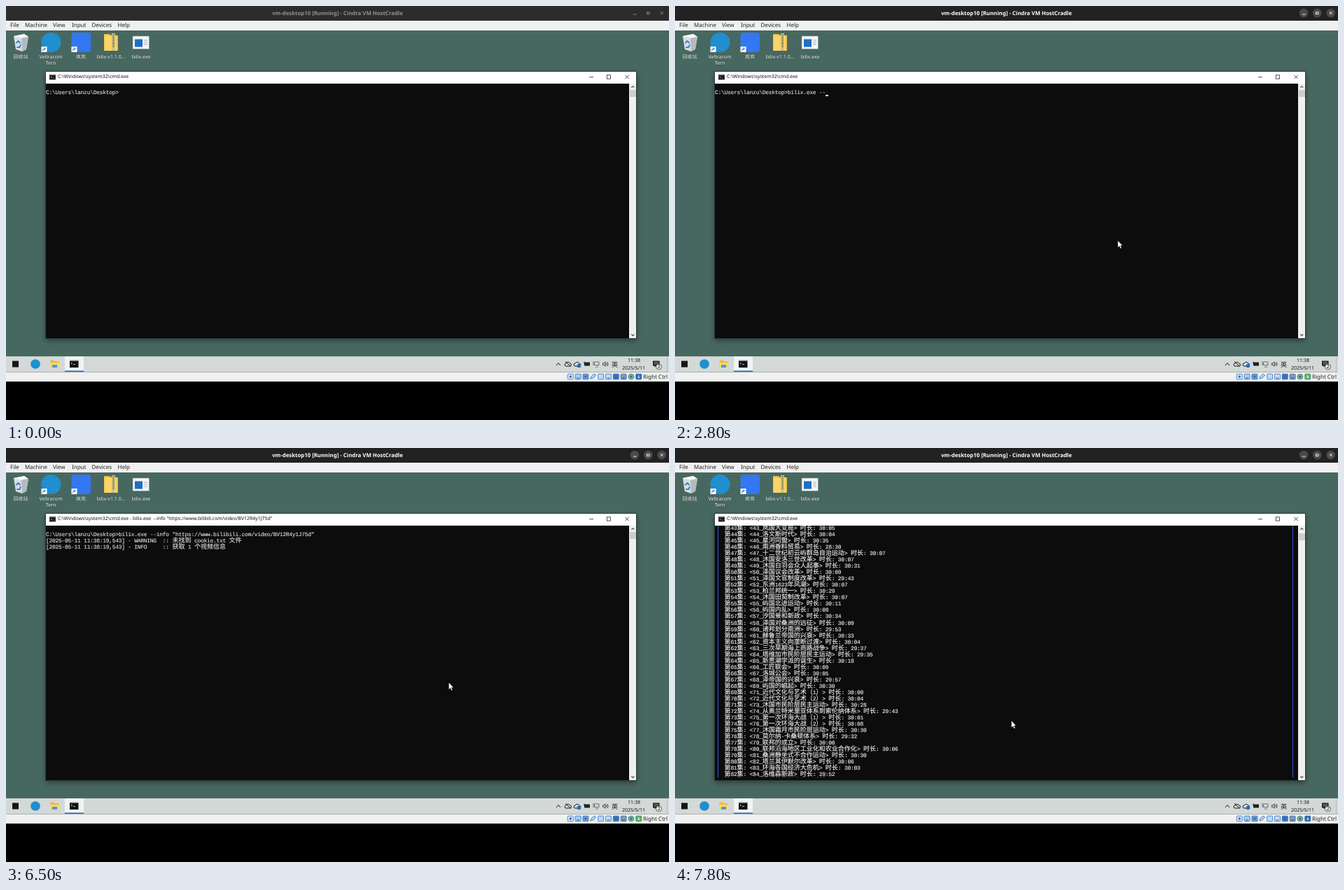
Recreate the animation shown at these times as an HTML page. Size 947 px wide and 592 px high, loop 8000 ms.

```html
<!DOCTYPE html>
<html lang="zh-CN">
<head>
<meta charset="utf-8">
<title>Terminal session</title>
<style>
html, body { margin: 0; width: 100%; height: 100%; overflow: hidden; background: #000; }
#stage { position: relative; width: 947px; height: 592px; overflow: hidden; text-rendering: geometricPrecision;
  font-family: "Noto Sans", "Noto Sans CJK SC", sans-serif; }
svg { position: absolute; left: 0; top: 0; }
svg text { white-space: pre; }
#win { position: absolute; left: 57px; top: 94px; width: 843px; height: 381px; background: #0c0c0c;
  box-shadow: 0 0 0 1px #2a3d39, 0 3px 8px rgba(0,0,0,.45); }
#win svg { top: -1px; }
#bar { position: absolute; width: 100%; height: 17px; background: #fff; }
#name { position: absolute; left: 17px; top: -1px; font-size: 6.9px; line-height: 17px; white-space: pre; color: #111; }
#scroll { position: absolute; right: 0; top: 17px; bottom: 0; width: 10px; background: #f0f0f0; }
#thumb { position: absolute; left: 1px; width: 8.5px; height: 10px; background: #cdcdcd; }
#term { position: absolute; left: 0; top: 17px; width: 833px; height: 360px; overflow: hidden; color: #e2e2e2;
  font: 8px/9.02px "Liberation Mono", monospace; letter-spacing: -.291px; -webkit-text-stroke: .12px; }
#page { position: absolute; left: 0; top: 0; width: 100%; }
.row { position: absolute; left: 0; white-space: pre; height: 9.02px; }
.row span { font: 500 9.02px/0 "Noto Sans CJK SC", sans-serif; letter-spacing: 0; }
.bright { color: #f4f4f4; }
#frame { position: absolute; left: 4px; top: -5px; width: 822px; border: 1px solid #3560e0; box-sizing: border-box; }
#caret { position: absolute; width: 4.6px; height: 1.8px; background: #e4e4e4; }
</style>
</head>
<body>
<div id="stage">
<svg width="947" height="592" viewBox="0 0 947 592">
  <rect id="top" width="947" height="21"/>
  <text id="caption" x="473.5" y="12.8" font-size="7.8" font-weight="700" text-anchor="middle">vm-desktop10 [Running] - Cindra VM HostCradle</text>
  <g id="discs" fill="#4a4a4a"><circle cx="898" cy="10" r="6.3"/><circle cx="917.3" cy="10" r="6.3"/><circle cx="936.7" cy="10" r="6.3"/></g>
  <g id="marks" fill="none" stroke-width=".9"><path d="M896 12h4.5M934.7 8l4 4m0-4l-4 4"/><rect x="915.4" y="8.8" width="3.6" height="2.8"/></g>

  <rect y="21" width="947" height="14" fill="#f0f0f0"/>
  <g font-size="8" fill="#222">
    <text x="6" y="30.3">File</text><text x="27" y="30.3">Machine</text><text x="67" y="30.3">View</text>
    <text x="94" y="30.3">Input</text><text x="122.5" y="30.3">Devices</text><text x="159.5" y="30.3">Help</text>
  </g>
  <rect y="35" width="947" height="466" fill="#476860"/>

  <!-- desktop icons -->
  <path d="M11 43l15-3 6 4-3 18-6 3-9-3z" fill="#d9dddf"/><path d="M11 43l15-3 6 4-10 2z" fill="#f5f6f6"/>
  <path d="M22 46l10-2-3 18-6 3z" fill="#b5bbbd"/>
  <path d="M14.5 53l3-3 3 3m.5 2l-1.5 4h-4" fill="none" stroke="#2d83cf" stroke-width="1.8"/>
  <circle cx="64.5" cy="52" r="14" fill="#1f8fd0"/>
  <rect x="93.5" y="38" width="27.5" height="28" rx="4" fill="#3377f2"/>
  <g id="links"></g>
  <path d="M140 40h8l2 2h10v22h-20z" fill="#e8b93c"/><path d="M140.5 42h18v22h-18z" fill="#fbd568"/>
  <path d="M151 39h5v25h-5z" fill="#d6c37c"/><path d="M153.5 40v19" stroke="#6d6445" stroke-width="2" stroke-dasharray="1.2 1"/>
  <rect x="181" y="43" width="23.5" height="18.5" fill="#f4f6f7" stroke="#7d8588" stroke-width=".6"/>
  <rect x="184" y="47.5" width="11" height="11" fill="#1c6fc4"/>
  <path d="M197 49h5m-5 3h5m-5 3h5" stroke="#9aa5ac" stroke-width=".9"/>
  <g font-size="7" fill="#fff" text-anchor="middle" style="text-shadow:0 .6px 1px #000a">
    <text x="21" y="74.5">回收站</text><text x="64" y="74.5">Veltracom</text><text x="64" y="84">Tern</text>
    <text x="107" y="74.5">疾岚</text><text x="150" y="74.5">bilix-v1.1.0...</text><text x="193" y="74.5">bilix.exe</text>
  </g>

  <!-- taskbar -->
  <rect y="501" width="947" height="22.5" fill="#d3d9d7"/>
  <rect x="9" y="507.5" width="9" height="9" fill="#151515"/>
  <circle cx="42" cy="512" r="6.8" fill="#1f8fd0"/>
  <path d="M63.5 506.5h5l1 1.5h6v9h-12z" fill="#f4b93a"/><path d="M63.5 510h12v7h-12z" fill="#fdd76c"/><path d="M66 517v-4h7v4" fill="#4a9be0"/>
  <rect x="84" y="501" width="27" height="22" fill="#f0f3f2"/><rect x="84" y="521.5" width="27" height="1.7" fill="#0f6fc6"/>
  <rect x="91" y="507" width="12.5" height="10" fill="#111"/><rect x="91" y="506.5" width="12.5" height="1.3" fill="#8b9294"/>
  <path d="M93 510l1.5 1-1.5 1m3 .5h3" fill="none" stroke="#ddd" stroke-width=".8"/>
  <g fill="none" stroke="#1c1c1c" stroke-width="1">
    <path d="M786 514l3-3.5 3 3.5"/>
    <path d="M800 515h5.5a2 2 0 000-4a3 3 0 00-5.5 0a2 2 0 000 4zM799 508.5l8 7"/>
    <path d="M813 515h5.5a2 2 0 000-4a3 3 0 00-5.5 0a2 2 0 000 4z"/>
    <rect x="826.5" y="510" width="7" height="4" fill="#222"/><path d="M826 508.5v3"/>
    <path d="M840.5 509h6.5v4.5h-6.5zM842 516h4M839 508v6" stroke="#555" stroke-width=".8"/>
    <path d="M852.5 510.8h1.5l2-2v6.5l-2-2h-1.5zM857.5 510.5q1 1.5 0 3M859 509q2 3 0 6" stroke-width=".8"/>
  </g>
  <circle cx="818.5" cy="514.5" r="2.8" fill="#1d6fc2"/>
  <g font-size="7" fill="#181818" text-anchor="middle">
    <text x="869.5" y="515.6" font-size="9">英</text><text x="897" y="509.3">11:38</text><text x="896.5" y="519.6">2025/5/11</text>
  </g>
  <path d="M924 507.5h9.5v7h-5l-2 2v-2H924z" fill="#1b1b1b"/><path d="M925.5 509.7h6.5m-6.5 2.2h6.5" stroke="#d3d9d7" stroke-width=".7"/>
  <circle cx="932.5" cy="516" r="4" fill="#e9eceb" stroke="#333" stroke-width=".7"/>
  <text x="932.5" y="518.3" font-size="6.5" text-anchor="middle">2</text>
  <path d="M944.5 502v21" stroke="#a9b0ae" stroke-width=".7"/>

  <!-- status bar -->
  <rect y="523.5" width="947" height="13.5" fill="#f0f0f0"/>
  <g id="lamps"></g>
  <text x="910" y="533.3" font-size="8" fill="#222">Right Ctrl</text>
</svg>

<div id="win">
  <div id="term"><div id="page"></div><div id="caret"></div></div>
  <div id="scroll"><div id="thumb"></div></div>
  <div id="bar"><div id="name"></div></div>
  <svg width="843" height="383" fill="none" stroke="#222" stroke-width=".8">
    <rect x="5.5" y="5.5" width="8" height="6.5" fill="#111"/><path d="M5.5 6h8" stroke="#999"/><path d="M7 8l1.2 1L7 10m2.5 0h2" stroke="#eee" stroke-width=".6"/>
    <path d="M776 8.7h6M827.3 5.7l5.5 5.5m0-5.5l-5.5 5.5"/><rect x="801.3" y="5.8" width="5.3" height="5.3"/>
    <path d="M836.3 23.7l2-2 2 2M836.3 376.5l2 2 2-2" stroke="#444" stroke-width="1.1"/>
  </svg>
</div>
<svg id="mouse" width="10" height="14"><path d="M.5.5v9.7l2.2-2 1.6 3.6 1.6-.7-1.6-3.5h2.9z" fill="#fff" stroke="#222" stroke-width=".4"/></svg>
</div>

<script>
const $ = id => document.getElementById(id);
const ROW = 9.02, COL = 4.51, FIRST = 43;
const PROMPT = 'C:\\Users\\lanzu\\Desktop>';
const CMD = 'bilix.exe --info ';
const URL_TEXT = 'https://www.bilibili.com/video/BV12R4y1J75d';
const SHELL = 'C:\\Windows\\system32\\cmd.exe';

// title and duration of each episode
const episodes = `岚国大变局 30:05
洛文斯时代 30:04
星河同盟 30:35
南洲香料贸易 28:30
十二世纪初云屿群岛自治运动 30:07
沐国安洛三世改革 30:07
沐国白羽会众人起事 30:31
泽国议会改革 30:09
泽国文官制度改革 29:43
东洲1623年风潮 30:07
柏兰邦统一 30:29
沐国田契制改革 30:07
屿国北进运动 30:11
屿国内乱 30:08
汐国景和新政 30:34
泽国对桑洲的远征 30:09
诸邦划分南洲 29:53
赫鲁兰帝国的兴衰 30:33
资本主义向垄断过渡 30:04
三次早期海上商路战争 29:37
塔维加市民阶层民主运动 29:35
新思潮学派的诞生 30:18
工匠联会 30:09
洛城公会 30:05
泽帝国的兴衰 29:57
屿国的崛起 30:30
近代文化与艺术（1） 30:00
近代文化与艺术（2） 30:04
沐国市民阶层民主运动 30:28
从奥兰特米里亚体系到索伦纳体系 29:43
第一次环海大战（1） 30:01
第一次环海大战（2） 30:08
沐国霜月市民阶层运动 30:30
莫尔纳-卡桑顿体系 29:32
联邦的成立 30:00
联邦沿海地区工业化和农业合作化 30:06
桑洲静坐式不合作运动 30:30
塔兰其伊默尔改革 30:06
环海各国经济大危机 30:03
洛维森新政 29:52
柏兰的集权主义 30:33
汐国的集权主义 30:02
埃斯兰内乱 30:03
恩图俄米亚抗柏战争 30:08
第二次环海大战（1） 30:20
第二次环海大战（2） 30:05
第二次环海大战（3） 30:08
第二次环海大战（4） 30:05
环海会的建立 30:07
对峙的形成 29:22
云屿归乡主义及维塔列建国 30:05
科岛变革 28:58
塞米士运河的开通 30:08
纳兰七月变革 30:01
青湾会议 30:13`.split('\n').map((line, i) => {
  const [title, length] = line.split(' '), ep = FIRST + i;
  const part = ep + (ep > 58) + (ep > 68) + (ep > 90);
  return `   第${ep}集: <${part}_${title}> 时长: ${length}`;
});
const log = (ms, level, msg) => `[2025-05-11 11:38:${ms}] - ${level.padEnd(7)}  :: ${msg}`;
const startLog = [log('19,543', 'WARNING', '未找到 cookie.txt 文件'), log('19,543', 'INFO', '获取 1 个视频信息')];
const result = [...episodes, '', '', '', log('20,028', 'INFO', '总耗时: 485 ms'), '', PROMPT];

// key times and the command line after each key
const keys = [[1600, 'b']];
for (let i = 2; i <= CMD.length; i++) keys.push([1800 + (i - 2) * 93, CMD.slice(0, i)]);
keys.push([4400, CMD + '"'], [4900, CMD + '"' + URL_TEXT], [5300, CMD + '"' + URL_TEXT + '"']);
const ENTER = 5700, LOGGED = 6300, DONE = 6800, WHEEL = 7200;

function rowNode(text, i) {
  const row = document.createElement('div');
  row.className = text.startsWith(' ') ? 'row bright' : 'row';
  row.style.top = i * ROW + .2 + 'px';
  text.split(/([\u3000-\uffef]+)/).forEach((run, k) => {
    if (k % 2 === 0) return row.append(run);
    const wide = document.createElement('span');
    wide.textContent = run;
    row.append(wide);
  });
  return row;
}

let shown;
function setRows(rows, framed) {
  const key = rows.join('\n');
  if (key === shown) return;
  shown = key;
  $('page').replaceChildren(...rows.map(rowNode));
  if (!framed) return;
  const box = document.createElement('div');
  box.id = 'frame';
  box.style.height = (episodes.length + 2.5) * ROW + 4.8 + 'px';
  $('page').append(box);
}

const ease = x => { x = Math.min(1, Math.max(0, x)); return x * x * (3 - 2 * x); };
const mix = (a, b, k) => a + (b - a) * k;

function drawMouse(t) {
  const enter = ease((t - 300) / 700), leave = ease((t - WHEEL) / 500);
  const x = mix(mix(880, 632, enter), 480, leave), y = mix(mix(440, 335, enter), 389.5, leave);
  $('mouse').style.transform = `translate(${x}px, ${y}px)`;
  $('mouse').style.visibility = t < 300 ? 'hidden' : 'visible';
}

function drawTerminal(t) {
  const done = t >= DONE;
  let last = -600, typed = '';
  for (const [at, text] of keys) if (t >= at) [last, typed] = [at, text];
  if (done) last = DONE;
  const notches = t < WHEEL ? 0 : Math.min(7, Math.floor((t - WHEEL) / 100) + 1);
  const top = done ? 21 - 3 * notches : 0;
  setRows(done ? result : ['', PROMPT + typed, ...(t >= LOGGED ? startLog : [])], done);
  $('page').style.transform = `translateY(${-top * ROW}px)`;

  const running = t >= ENTER && !done;
  const line = done ? result.length - 1 - top : 1;
  const col = PROMPT.length + (done ? 0 : typed.length);
  $('caret').style.left = col * COL + 'px';
  $('caret').style.top = line * ROW + 6.8 + 'px';
  $('caret').style.visibility = !running && (t - last) % 1060 < 530 ? 'visible' : 'hidden';
  $('name').textContent = SHELL + (running ? ` - bilix.exe  --info "${URL_TEXT}"` : '');
  $('thumb').style.top = (done ? 12.1 - notches * .18 : 8.8) + 'px';
}

function drawHost(t) {
  const active = t >= 300;
  $('top').setAttribute('fill', active ? '#222' : '#2c2c2c');
  $('caption').setAttribute('fill', active ? '#fff' : '#929292');
  $('marks').setAttribute('stroke', active ? '#fff' : '#929292');
  $('discs').setAttribute('visibility', active ? 'visible' : 'hidden');
  $('lamp9').setAttribute('fill', active && t < WHEEL ? '#62b846' : '#2668b5');
}

$('links').innerHTML = [50.5, 93.5].map(x =>
  `<rect x="${x}" y="58" width="8" height="8" fill="#fff"/><path d="M${x + 2} 64q0-3 3.5-3m-1.5-1.5l1.8 1.5-1.8 1.6" fill="none" stroke="#2463a8" stroke-width="1"/>`).join('');

const lampFill = ['#d8e8f8', '#a9cdf0', '#6f9fd8', '#a9d3f5', '#b9dcf8', '#c9dcf2', '#3b72c4', '#8d94b0', '#7cc45c', '#2668b5'];
$('lamps').innerHTML = lampFill.map((fill, i) => {
  const x = 802.3 + i * 10.83, mid = x + 4;
  const inner = [`<circle cx="${mid}" cy="530" r="1.7" fill="#2a6cb8"/>`, `<path d="M${x + 2} 532h4" stroke="#2a5f9e"/>`,
    `<path d="M${mid} 528v4m-1.5-1.5l1.5 1.5 1.5-1.5" fill="none" stroke="#fff" stroke-width=".9"/>`][i === 9 ? 2 : i % 2];
  const shape = i === 3 ? `<path d="M${x} 533l1-3 4-4 3 2-4 4z"` : `<rect x="${x}" y="526.2" width="8" height="7.6" rx="${i === 8 ? 4 : 1}"`;
  return `${shape} id="lamp${i}" fill="${fill}" stroke="#2f6fb5" stroke-width=".8"/>${i === 3 || i === 4 ? '' : inner}`;
}).join('');

function tick() {
  const t = performance.now() % 8000;
  drawHost(t);
  drawTerminal(t);
  drawMouse(t);
  requestAnimationFrame(tick);
}
tick();
</script>
</body>
</html>
```
